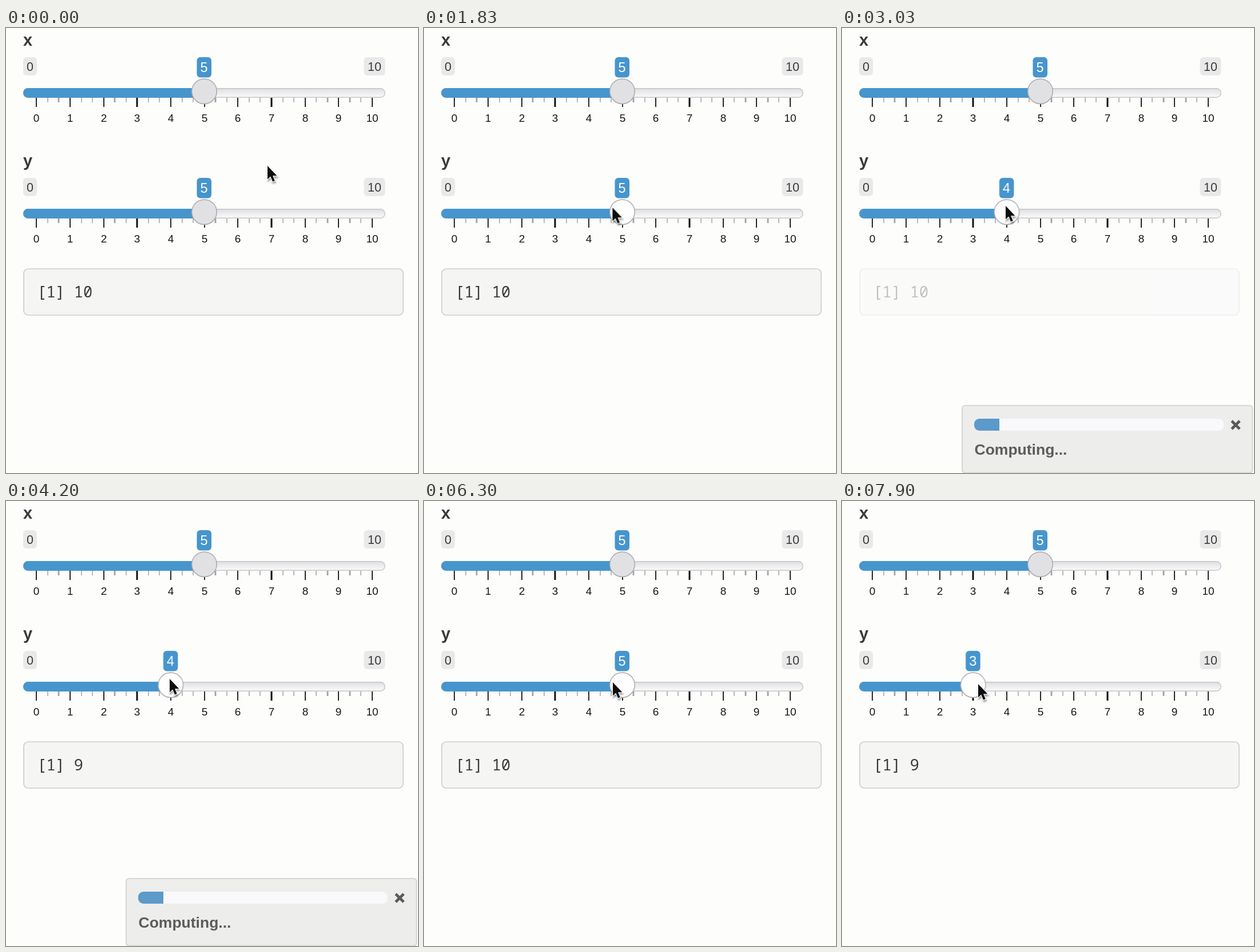
Recreate the animation shown at these times as an HTML page. Size 720x778 px, loop 8000 ms.

```html
<!DOCTYPE html>
<html lang="en">
<head>
<meta charset="utf-8">
<title>Slider demo</title>
<style>
  html, body { margin: 0; width: 100%; height: 100%; overflow: hidden; background: #fdfdfc; }
  svg { display: block; width: 720px; height: 778px; font-family: "Liberation Sans", Arial, sans-serif; }
  .label { font-size: 29px; font-weight: bold; fill: #3a3a3c; }
  .badge { fill: #e9e9ea; }
  .limit { font-size: 21.5px; fill: #3c3c3c; text-anchor: middle; }
  .value { font-size: 23.5px; fill: #fff; text-anchor: middle; }
  .scale { font-size: 19px; fill: #161616; text-anchor: middle; }
  .blue { fill: #4695cd; }
  .rail { fill: url(#rail); stroke: #c6c6c9; stroke-width: 1.4; }
  .knob { fill: #e1e1e4; stroke: #aaaaac; stroke-width: 1.5; }
  .code { font: 26.8px "Noto Sans Mono", "DejaVu Sans Mono", monospace; fill: #383838; white-space: pre; }

  .move, .hover, .v5, .v4, .v3, .ten, .nine, .dim, .panel, .progress, .cursor {
    animation: 8s linear infinite;
  }
  .move, .hover, .v5, .v4, .v3, .ten, .nine { animation-timing-function: step-end; }
  .move { animation-name: move; }
  .hover { animation-name: hover; }
  .v5 { animation-name: v5; }
  .v4 { animation-name: v4; }
  .v3 { animation-name: v3; }
  .ten { animation-name: ten; }
  .nine { animation-name: nine; }
  .dim { animation-name: dim; }
  .panel { animation-name: panel; }
  .progress { animation-name: progress; transform-origin: 231px 0; }
  .cursor { animation-name: cursor; }

  @keyframes move {
    0%, 63.875% { transform: translateX(0); }
    24.375%, 80.5% { transform: translateX(-58.67px); }
    97.5%, 100% { transform: translateX(-117.33px); }
  }
  @keyframes hover {
    0% { fill: #e1e1e4; }
    16.1%, 100% { fill: #fefefe; }
  }
  @keyframes v5 {
    0%, 63.875% { visibility: visible; }
    24.375%, 80.5%, 100% { visibility: hidden; }
  }
  @keyframes v4 {
    0%, 63.875%, 97.5%, 100% { visibility: hidden; }
    24.375%, 80.5% { visibility: visible; }
  }
  @keyframes v3 {
    0% { visibility: hidden; }
    97.5%, 100% { visibility: visible; }
  }
  @keyframes ten {
    0%, 67% { visibility: visible; }
    52.45%, 83.6%, 100% { visibility: hidden; }
  }
  @keyframes nine {
    0%, 67% { visibility: hidden; }
    52.45%, 83.6%, 100% { visibility: visible; }
  }
  @keyframes dim {
    0% { opacity: 1; }
    33.75% { opacity: 1; animation-timing-function: ease; }
    36.875% { opacity: .3; animation-timing-function: step-end; }
    52.45%, 100% { opacity: 1; }
  }
  @keyframes panel {
    0% { opacity: 0; animation-timing-function: step-end; }
    27.45% { opacity: 1; }
    52.4% { opacity: 1; animation-timing-function: ease-in-out; }
    55.3%, 100% { opacity: 0; }
  }
  @keyframes progress {
    0%, 27.4% { transform: scaleX(0); animation-timing-function: ease; }
    34.9%, 100% { transform: scaleX(1); }
  }
  @keyframes cursor {
    0% { transform: translate(457px, 241px); }
    11.7% { transform: translate(457px, 241px); animation-timing-function: ease-in-out; }
    18.25% { transform: translate(330px, 314px); }
    22.7% { transform: translate(330px, 314px); animation-timing-function: ease-in; }
    24.375% { transform: translate(303px, 316px); animation-timing-function: ease-out; }
    25.75% { transform: translate(286px, 311px); }
    62.1% { transform: translate(286px, 311px); }
    62.5% { transform: translate(294px, 311px); }
    63.875% { transform: translate(316px, 315px); animation-timing-function: ease-out; }
    65% { transform: translate(330px, 317px); }
    78.7% { transform: translate(330px, 317px); animation-timing-function: ease-in; }
    80.5% { transform: translate(303px, 318px); animation-timing-function: ease-out; }
    82% { transform: translate(288px, 319px); }
    96.1% { transform: translate(288px, 319px); animation-timing-function: ease-in-out; }
    98.75%, 100% { transform: translate(238px, 320px); }
  }
</style>
</head>
<body>
<svg viewBox="0 0 720 778">
  <defs>
    <linearGradient id="rail" x2="0" y2="1">
      <stop offset="0" stop-color="#dfdfe1"/>
      <stop offset="1" stop-color="#fbfbfc"/>
    </linearGradient>
    <clipPath id="track"><rect x="30" y="105" width="633" height="17" rx="8.5"/></clipPath>
    <clipPath id="meter"><rect x="231" y="683" width="436" height="21" rx="9"/></clipPath>
    <filter id="shadow" x="-50%" y="-30%" width="220%" height="180%">
      <feDropShadow dx="1" dy="3" stdDeviation="1.8" flood-opacity=".4"/>
    </filter>
  </defs>

  <text class="label" x="30" y="31">x</text>
  <text class="label" x="30" y="242">y</text>
  <g id="sliders"></g>

  <g class="dim">
    <rect x="31" y="421" width="663" height="81" rx="8" fill="#f5f5f4" stroke="#cecece" stroke-width="1.7"/>
    <text class="code ten" x="54.5" y="471">[1] 10</text>
    <text class="code nine" x="54.5" y="471">[1] 9</text>
  </g>

  <g class="panel">
    <rect x="210" y="660" width="507.5" height="117.5" rx="5" fill="#ededec" stroke="#d0d0d0" stroke-width="1.7"/>
    <g clip-path="url(#meter)">
      <rect x="231" y="683" width="436" height="21" fill="#f9f9fb"/>
      <rect class="progress" x="231" y="683" width="44" height="21" fill="#5c9ac9"/>
    </g>
    <path d="M681 687l14 14m0-14l-14 14" stroke="#5a5a5a" stroke-width="4.6"/>
    <text x="231.5" y="746" font-size="26.5" font-weight="bold" fill="#5c5c5c">Computing...</text>
  </g>

  <g class="cursor">
    <path filter="url(#shadow)" d="M0 0V23.5L5.2 18.6 9 27.5 12.8 25.9 9.1 17.2H16.4Z"
          fill="#0c0c0c" stroke="#fff" stroke-width="2" paint-order="stroke"/>
  </g>
</svg>
<script>
  const START = 53.3, STEP = 58.67;
  const text = (cls, x, y, s) => `<text class="${cls}" x="${x}" y="${y}">${s}</text>`;
  const badge = (cls, x, w, h) => `<rect class="${cls}" x="${x}" y="51" width="${w}" height="${h}" rx="6"/>`;
  const tick = (x, w, h, color) => `<rect x="${x - w / 2}" y="122" width="${w}" height="${h}" fill="${color}"/>`;

  function scale() {
    let out = '';
    for (let i = 0; i <= 30; i++) {
      const x = Math.round(START + i * STEP / 3), n = i / 3;
      if (i % 3) {
        out += tick(x, [2, 7, 16, 26, 28].includes(i) ? 2.8 : 1.5, 8, '#a2a2a2');
      } else {
        out += tick(x, n === 3 || n === 7 ? 3 : 1.8, 16, '#111') + text('scale', x, 164, n);
      }
    }
    return out;
  }

  function slider(y, live) {
    const move = live ? 'move' : '';
    const values = live ? [5, 4, 3] : [5];
    return `<g transform="translate(0 ${y})">
      ${badge('badge', 30, 24, 32)}${text('limit', 42, 75, 0)}
      ${badge('badge', 625.5, 37, 32)}${text('limit', 644, 75, 10)}
      ${scale()}
      <rect class="rail" x="30.7" y="105.7" width="631.5" height="15.6" rx="7.8"/>
      <g clip-path="url(#track)"><rect class="blue ${move}" x="0" y="105" width="346" height="17"/></g>
      <g class="${move}">
        ${badge('blue', 333.5, 25.5, 35.5)}
        ${values.map(v => text('value' + (live ? ' v' + v : ''), 346, 77, v)).join('')}
        <circle class="knob ${live ? 'hover' : ''}" cx="346.5" cy="110.7" r="21.8"/>
      </g>
    </g>`;
  }

  document.getElementById('sliders').innerHTML = slider(0, false) + slider(211, true);
</script>
</body>
</html>
```
